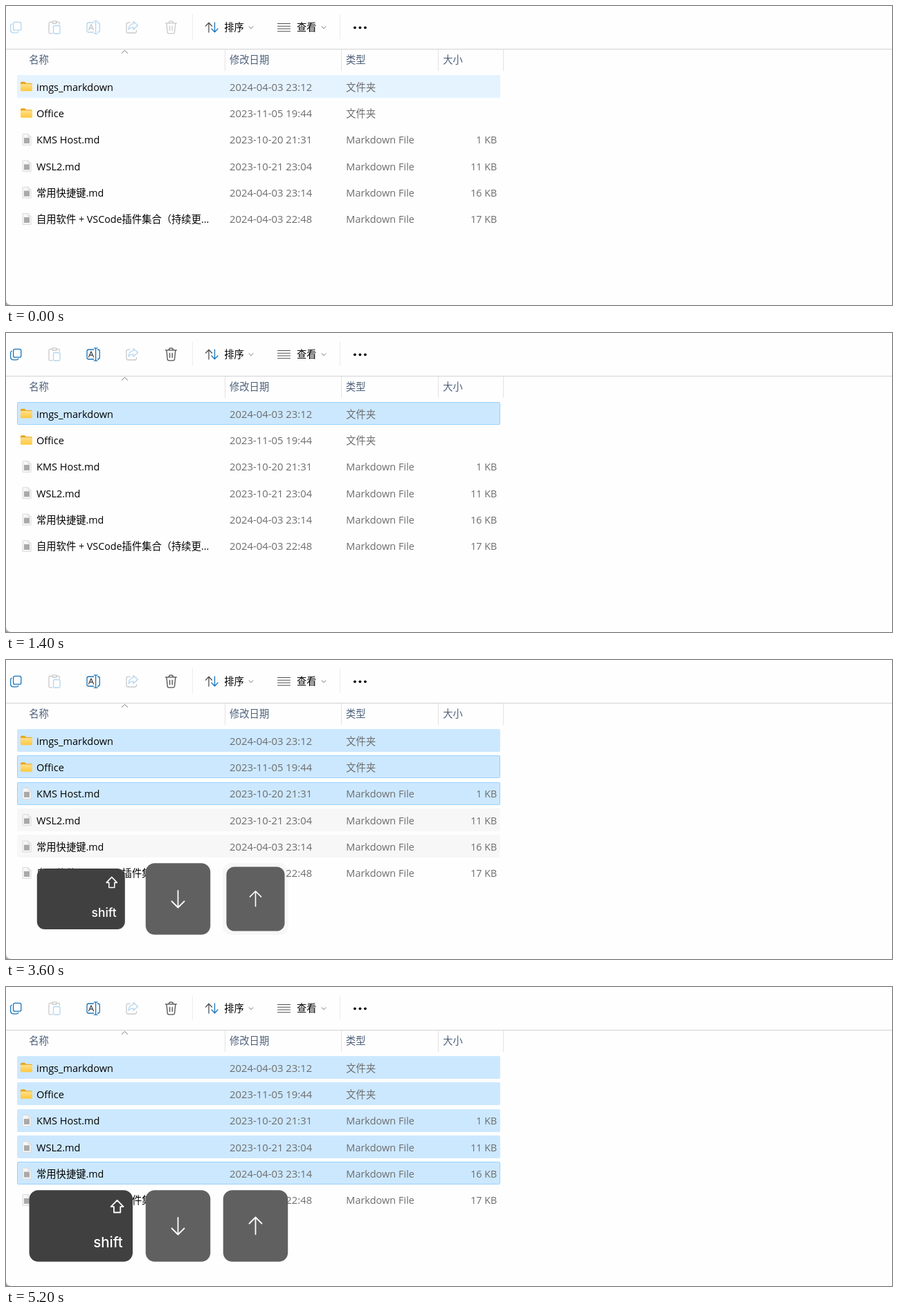
These frames come from a looping animation (1280x433 px, 5.8 s). An HTML page:

```html
<!DOCTYPE html>
<html lang="zh-CN">
<head>
<meta charset="utf-8">
<title>文件多选</title>
<style>
html, body { margin: 0; width: 100%; height: 100%; overflow: hidden; background: #fefefe; }
svg { display: block; width: 1280px; height: 433px; }
text { font-family: "Open Sans", "Noto Sans CJK SC", "Noto Sans CJK", sans-serif; font-size: 14.5px; white-space: pre; }
.cjk { font-size: 14.3px; }
.head { fill: #4c607a; }
.meta { fill: #6d6d6d; }
.date { font-size: 14.85px; }
.line { fill: none; stroke-width: 1.3; stroke-linecap: round; stroke-linejoin: round; }
.blue { stroke: #b3d6ee; }
.dark { stroke: #c9c9c9; }
.on .blue { stroke: #1975ba; }
.on .dark { stroke: #4d4d4d; }
.key path { fill: none; stroke: #fff; stroke-width: 1.8; stroke-linecap: round; stroke-linejoin: round; }
.key text { font: 500 20.5px Inter, sans-serif; fill: #fff; text-anchor: end; }
</style>
</head>
<body>
<svg id="stage" viewBox="0 0 1280 433"></svg>
<script>
const LOOP = 5800;
const stage = document.getElementById("stage");

const files = [
  ["imgs_markdown", "2024-04-03 23:12"],
  ["Office", "2023-11-05 19:44"],
  ["KMS Host.md", "2023-10-20 21:31", "1 KB"],
  ["WSL2.md", "2023-10-21 23:04", "11 KB"],
  ["常用快捷键.md", "2024-04-03 23:14", "16 KB"],
  ["自用软件 + VSCode插件集合（持续更...", "2024-04-03 22:48", "17 KB"],
];

// Each track is a list of [start time, value] steps.
const focusTrack = [[0, -1], [800, 0], [2400, 1], [2600, 2], [2800, 3], [3000, 4],
  [3400, 3], [3600, 2], [3800, 1], [4200, 2], [4400, 3], [4600, 4]];
const hoverTrack = [[0, 0], [200, 1], [400, 0], [1200, 1], [1400, -1], [1800, 1], [5200, -1]];
const keys = [
  { id: "shift", x: 108.3, w: 149.5, color: "#404040", art:
    `<path d="M52.3 -37.2L61.3 -27.8H57V-19.5H47.6V-27.8H43.3Z"/><text x="60.5" y="31">shift</text>`,
    scale: [[0, 0], [1800, .85], [5000, 1.01], [5200, 1]] },
  { id: "down", x: 248.5, w: 93.5, color: "#606060", art: `<path d="M0 -12V12M-9 3.5L0 12.5L9 3.5"/>`,
    scale: [[0, 0], [2400, .985], [2600, .89], [2800, .928], [3000, .9], [3200, 1.012], [3400, 1],
      [4200, .888], [4400, .928], [4600, .947], [4800, 1.012], [5000, 1]] },
  { id: "up", x: 360.5, w: 93.5, color: "#606060", art: `<path d="M0 12V-12M-9 -3.5L0 -12.5L9 -3.5"/>`,
    scale: [[0, 0], [3400, .966], [3600, .9], [3800, 1.012], [4000, 1]] },
];

const at = (track, t) => track.filter(([start]) => start <= t).pop()[1];
const text = (x, y, cls, str, extra = "") => `<text x="${x}" y="${y}" class="${cls}" ${extra}>${str}</text>`;
const line = (cls, d, extra = "") => `<path class="line ${cls}" d="${d}" ${extra}/>`;
const vRule = (x, y, h, color) => `<rect x="${x}" y="${y}" width="1" height="${h}" fill="${color}"/>`;
const rowTop = i => Math.round(100 + 38.35 * i);

const folderIcon = y => `<g transform="translate(21 ${y})">
  <path d="M0 1.5Q0 0 1.5 0H6L8 2H15.5Q17 2 17 3.5V8H0Z" fill="#e8a317"/>
  <rect y="3" width="17" height="10.5" rx="1.3" fill="url(#folder)"/></g>`;
const fileIcon = y => `<g transform="translate(23.5 ${y})">
  <path d="M1 .5H8.5L12.5 4.5V16.5H.5V1Z" fill="#f7f7f7" stroke="#d2d2d2" stroke-width=".8"/>
  <path d="M8.5 .5V4.5H12.5" fill="none" stroke="#d2d2d2" stroke-width=".8"/>
  <rect x="2.5" y="6" width="8" height="8" fill="#a9a9a9"/></g>`;

function toolbar() {
  const copy = line("blue", "M12.8 23.3H19.6Q21.8 23.3 21.8 25.5V33Q21.8 35.2 19.6 35.2H12.8Q10.6 35.2 10.6 33V25.5Q10.6 23.3 12.8 23.3Z")
    + line("blue", "M8.2 26.2Q6.6 27 6.6 29V34.5Q6.6 38.8 11 38.8H15Q17 38.8 17.8 37.2");
  const paste = line("dark", "M66 23.3H63.5Q62 23.3 62 25V38.3Q62 39.8 63.5 39.8H67M74 23.3H76Q77.3 23.3 77.3 25V26.5M67 21.8H73V25H67Z")
    + line("blue", "M70 28.5H76.5Q78 28.5 78 30V38.5Q78 40 76.5 40H70Q68.5 40 68.5 38.5V30Q68.5 28.5 70 28.5Z");
  const rename = line("blue", "M126.5 24H119.5Q117 24 117 26.5V35.5Q117 38 119.5 38H126.5M132.5 24Q135.3 24 135.3 26.8V35.2Q135.3 38 132.5 38M129.6 21.8V40.2M127.3 21.8H132M127.3 40.2H132")
    + line("dark", "M119.5 34.8L123 26.8L126.5 34.8M120.7 32H125.3");
  const share = line("dark", "M179 24.2H176.5Q174 24.2 174 26.7V36.5Q174 39 176.5 39H186Q188.5 39 188.5 36.5V35.5")
    + line("blue", "M184 22.5L190.5 28.2L184 34V30.8Q179.5 30.5 177 34.2Q177.5 26.5 184 25.7Z");
  const trash = line("dark", "M230.3 24.8H246.5M235.3 24.5Q235.3 21.8 238.4 21.8Q241.5 21.8 241.5 24.5M232 25L233.2 37.8Q233.4 39.8 235.4 39.8H241.4Q243.4 39.8 243.6 37.8L244.8 25M236.6 29.2V35.5M240.2 29.2V35.5");
  const chevron = x => line("", `M${x - 3} 29.7L${x} 32.6L${x + 3} 29.7`, 'stroke="#777" style="stroke-width:1"');
  return `<g class="actions">${copy}${rename}${trash}</g>${paste}${share}`
    + vRule(269, 12, 36, "#ececec") + vRule(482, 12, 36, "#ececec")
    + line("", "M293 38V24.5M288.5 29L293 24.3L297.5 29", 'stroke="#505050"')
    + line("", "M301.5 24V37.5M297 33L301.5 37.8L306 33", 'stroke="#1975ba"')
    + text(315.3, 36.3, "cjk", "排序") + chevron(354)
    + line("", "M392.5 25.5H410.5M392.5 29.2H410.5M392.5 33H410.5M392.5 36.7H410.5", 'stroke="#505050" style="stroke-width:1.1"')
    + text(420, 36.3, "cjk", "查看") + chevron(459)
    + [504, 511.5, 519].map(x => `<circle cx="${x}" cy="31.3" r="1.9"/>`).join("");
}

function header() {
  const titles = [[33.3, "名称"], [323, "修改日期"], [491, "类型"], [631.3, "大小"]];
  return `<rect y="62" width="1280" height="1" fill="#d2d2d2"/>`
    + [316, 484, 624, 718].map(x => vRule(x, 63, 31, "#e3e3e3")).join("")
    + line("", "M167.3 68.3L171.5 64.3L175.7 68.3", 'stroke="#777" style="stroke-width:1"')
    + titles.map(([x, s]) => text(x, 83.3, "cjk head", s)).join("");
}

function fileRow([name, date, size], i) {
  const base = 122.5 + 38.35 * i;
  const cjk = i > 3 ? "cjk" : "";
  return (size ? fileIcon(base - 14.3) : folderIcon(base - 12.7))
    + text(44, base, cjk, name) + text(323, base, "meta date", date)
    + text(491.3, base, size ? "meta" : "meta cjk", size ? "Markdown File" : "文件夹")
    + (size ? text(709.3, base, "meta cjk", size, 'text-anchor="end"') : "");
}

const keyBox = (w, h, fill) => `<rect x="${-w / 2}" y="${-h / 2}" width="${w}" height="${h}" rx="13" fill="${fill}"/>`;

stage.innerHTML = `<defs><linearGradient id="folder" x2="0" y2="1">
    <stop stop-color="#ffe08a"/><stop offset="1" stop-color="#ffc83d"/></linearGradient></defs>
  <rect width="1280" height="433" fill="#fefefe"/>
  <path d="M0 425Q0 433 8 433H0Z" fill="#a8a8a8"/>
  ${toolbar()}${header()}
  ${files.map((_, i) => `<rect class="row" x="16.5" y="${rowTop(i) + .5}" width="697" height="32" rx="1"/>`).join("")}
  ${keys.map(k => `<g class="halo" transform="translate(${k.x} 346)">${keyBox(k.w + 1.5, 104.5, "#f7f7f7")}</g>`).join("")}
  ${files.map(fileRow).join("")}
  ${keys.map(k => `<g class="key">${keyBox(k.w, 103.5, k.color)}${k.art}</g>`).join("")}`;

const actions = stage.querySelector(".actions");
const rows = [...stage.querySelectorAll(".row")];
const halos = [...stage.querySelectorAll(".halo")];
const keyNodes = [...stage.querySelectorAll(".key")];

function rowColors(i, focus, hover, t) {
  if (i <= focus) return ["#cce8ff", i === focus || i === hover ? "#99d1ff" : "#cce8ff"];
  if (i === hover) return ["#e5f3ff", "#e5f3ff"];
  if (t >= 3400 && i <= 4) return ["#f7f7f7", "#f7f7f7"];
  return ["none", "none"];
}

function render(t) {
  const focus = at(focusTrack, t), hover = at(hoverTrack, t);
  actions.classList.toggle("on", focus >= 0);
  rows.forEach((row, i) => {
    const [fill, stroke] = rowColors(i, focus, hover, t);
    row.setAttribute("fill", fill);
    row.setAttribute("stroke", stroke);
  });
  keys.forEach((key, i) => {
    const scale = at(key.scale, t);
    keyNodes[i].setAttribute("visibility", scale ? "visible" : "hidden");
    keyNodes[i].setAttribute("transform", `translate(${key.x} 346) scale(${scale || 1})`);
    const pressed = key.id !== "shift" && scale > 0 && scale < .96;
    halos[i].setAttribute("visibility", pressed ? "visible" : "hidden");
  });
}

const origin = performance.now();
function tick() {
  render((performance.now() - origin) % LOOP);
  requestAnimationFrame(tick);
}
tick();
</script>
</body>
</html>
```
